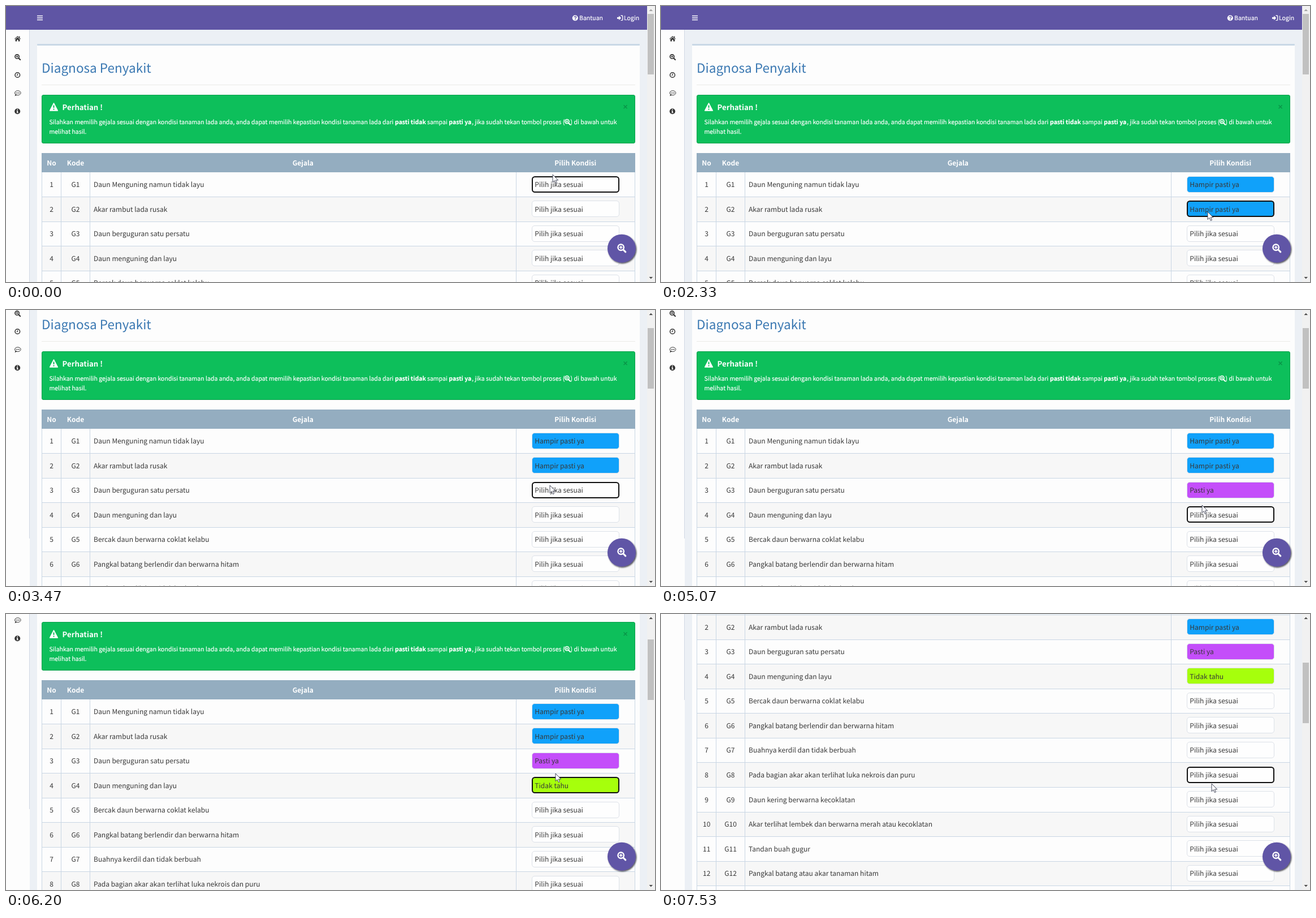
Recreate the animation shown at these times as an HTML page. Size 1148 px wide and 488 px high, loop 8000 ms.

```html
<!DOCTYPE html>
<html lang="id">
<head>
<meta charset="utf-8">
<title>Diagnosa Penyakit</title>
<style>
  html, body { margin: 0; width: 100%; height: 100%; overflow: hidden; background: #ecf0f5; }
  svg { display: block; width: 1148px; height: 488px; }
  text {
    font: 12.04px "Noto Sans CJK SC", "Noto Sans CJK JP", "Noto Sans CJK", sans-serif;
    fill: #383838; text-rendering: geometricPrecision;
  }
  .small { font-size: 10.54px; stroke: #fff; stroke-width: .2; }
  .white { fill: #fff; }
  .bold { font-weight: 700; }
  .mid { text-anchor: middle; }
  .title { font-size: 22.56px; fill: #3a78b2; }
  .head { font-size: 13.2px; }
  .line { fill: none; stroke: currentColor; }
</style>
</head>
<body>
<svg id="stage" viewBox="0 0 1148 488">
  <defs>
    <g id="zoom" class="line">
      <circle cx="-.9" cy="-.9" r="3.6" stroke-width="1.7"/>
      <path d="M1.9 1.9 4.7 4.7" stroke-width="2.1" stroke-linecap="round"/>
      <path d="M-2.8-.9H1M-.9-2.8V1" stroke-width="1.2"/>
    </g>
    <filter id="shade" x="-20%" y="-20%" width="150%" height="150%">
      <feDropShadow dx="1.3" dy="1.6" stdDeviation="1" flood-color="#14141c" flood-opacity=".75"/>
    </filter>
  </defs>

  <rect width="1148" height="488" fill="#ecf0f5"/>
  <rect width="42" height="488" fill="#fdfdfd"/>

  <g id="page">
    <rect x="41" y="42" width="1" height="446" fill="#d2d9e4"/>
    <rect width="1134" height="42" fill="#5f55a4"/>
    <path d="M55 17.5h10M55 21h10M55 24.5h10" stroke="#fff" stroke-width="1.7"/>
    <circle cx="1006.8" cy="21.2" r="5" fill="#fff"/>
    <path d="M1005 20c.1-2.2 3.7-2.2 3.7-.2 0 1.3-1.8 1.3-1.8 2.6M1006.9 23.2v1.5" fill="none" stroke="#5f55a4" stroke-width="1.4"/>
    <text class="small white" x="1014" y="25">Bantuan</text>
    <path d="M1081 19.7h3.2v-2.4l4 3.9-4 3.9v-2.4h-3.2z" fill="#fff"/>
    <path d="M1087.5 17h2.2q1.1 0 1.1 1.1v6.2q0 1.1-1.1 1.1h-2.2" fill="none" stroke="#fff" stroke-width="1.3"/>
    <text class="small white" x="1093" y="25">Login</text>

    <g color="#333" fill="#333">
      <path d="M20.5 53 26 58l-.7.8-4.8-4.3-4.8 4.3-.7-.8zM23 53.4h1.4v3L23 55zM20.5 55.5l3.9 3.4v3.7h-2.7v-2.8h-2.4v2.8h-2.7v-3.7z"/>
      <use href="#zoom" x="20.5" y="90.3"/>
      <circle class="line" cx="20.3" cy="122" r="4.3" stroke-width="1.5"/>
      <path class="line" d="M20.6 119.5v2.8h-2.2" stroke-width="1.1"/>
      <ellipse class="line" cx="20.8" cy="153.7" rx="5.3" ry="3.9"/>
      <path d="M16.5 156l-.9 3.2 4.2-2z"/>
      <path d="M17.5 153h1.5v1.5h-1.5zM20 153h1.5v1.5H20zM22.5 153H24v1.5h-1.5z"/>
      <circle cx="20.2" cy="186.2" r="5"/>
      <path d="M19.4 182.6h1.7v1.4h-1.7zM18.6 185h2.5v3.2h.8v1.1h-3.3v-1.1h.8v-2.1h-.8z" fill="#fff"/>
    </g>

    <rect x="55" y="68" width="1066" height="1100" fill="#fdfdfd"/>
    <rect x="55" y="67" width="1066" height="3" rx="1" fill="#c9d8e6"/>
    <text class="title" x="63" y="118">Diagnosa Penyakit</text>
    <rect x="63" y="139" width="1050" height="1" fill="#ebebe8"/>

    <rect x="63.5" y="157.5" width="1049" height="85" rx="2.5" fill="#0dbf5b" stroke="#06a04a"/>
    <path d="M84.5 171.8 91.4 185H77.6z" fill="#fff" stroke="#fff" stroke-width="1.4" stroke-linejoin="round"/>
    <path d="M84.5 175.5v4.6M84.5 181.6v2" stroke="#0dbf5b" stroke-width="2"/>
    <text class="head white bold" x="99.5" y="184">Perhatian !</text>
    <path d="M1092.6 175.3l6 6m0-6-6 6" stroke="#0a9448" stroke-width="1.5"/>
    <text class="small white" x="76.5" y="209">Silahkan memilih gejala sesuai dengan kondisi tanaman lada anda, anda dapat memilih kepastian kondisi tanaman lada dari</text>
    <text class="small white bold" x="688" y="209">pasti tidak</text>
    <text class="small white" x="745" y="209">sampai</text>
    <text class="small white bold" x="783.3" y="209">pasti ya</text>
    <text class="small white" x="824" y="209">, jika sudah tekan tombol proses (</text>
    <use href="#zoom" x="993.2" y="205" color="#fff"/>
    <text class="small white" x="998.6" y="209">) di bawah untuk</text>
    <text class="small white" x="76.5" y="226">melihat hasil.</text>

    <g id="table"></g>
  </g>

  <g filter="url(#shade)"><circle cx="1089" cy="428.7" r="25" fill="#6055a6"/></g>
  <use href="#zoom" transform="translate(1089 428) scale(1.45)" color="#fff"/>

  <rect x="1134" width="14" height="488" fill="#f1f1f1"/>
  <rect id="thumb" x="1135" y="14" width="11" height="107" fill="#c1c1c1"/>
  <path id="up" d="M1137.5 9l3.3-3.6 3.3 3.6z"/>
  <path d="M1137.5 479l3.3 3.6 3.3-3.6z" fill="#505050"/>
  <path id="cursor" d="M0 0v13.6l3.1-2.9 2.3 5 2.1-1-2.2-4.7h4.4z" fill="#fff" stroke="#33364a" stroke-width=".9"/>
</svg>

<script>
const LOOP = 8000;
const ROW_TOP = 294, ROW_STEP = 43.58, ROW_COUNT = 13;
const EMPTY = "Pilih jika sesuai";

const symptoms = [
  "Daun Menguning namun tidak layu",
  "Akar rambut lada rusak",
  "Daun berguguran satu persatu",
  "Daun menguning dan layu",
  "Bercak daun berwarna coklat kelabu",
  "Pangkal batang berlendir dan berwarna hitam",
  "Buahnya kerdil dan tidak berbuah",
  "Pada bagian akar akan terlihat luka nekrois dan puru",
  "Daun kering berwarna kecoklatan",
  "Akar terlihat lembek dan berwarna merah atau kecoklatan",
  "Tandan buah gugur",
  "Pangkal batang atau akar tanaman hitam"
];

// answers by row: time, label, fill
const answers = [
  [530, "Hampir pasti ya", "#10a1fa"],
  [2070, "Hampir pasti ya", "#10a1fa"],
  [4270, "Pasti ya", "#c44efa"],
  [5870, "Tidak tahu", "#a6ff0c"]
];
// time, focused row
const focus = [[0, 1], [1270, 2], [3470, 3], [5070, 4], [7530, 8]];
// time, scroll offset
const scroll = [[0, 0], [2600, 0], [2670, 30], [2740, 64], [2830, 84], [6070, 84],
  [6200, 143], [6270, 172], [6480, 290], [6600, 336]];
// time, pointer x, pointer y
const pointer = [[0, 967, 298], [530, 967, 298], [1200, 967, 364], [2330, 967, 364],
  [2640, 960, 305], [3070, 960, 305], [3270, 962, 310], [4270, 962, 310],
  [5000, 957, 345], [5870, 957, 345], [6150, 972, 282], [6730, 972, 282], [7070, 974, 300]];

const $ = id => document.getElementById(id);

function set(node, attrs) {
  for (const key in attrs) node.setAttribute(key, attrs[key]);
}
function add(tag, attrs, text) {
  const node = document.createElementNS("http://www.w3.org/2000/svg", tag);
  set(node, attrs);
  if (text !== undefined) node.textContent = text;
  return $("table").appendChild(node);
}
const box = (x, y, width, height, fill) => add("rect", { x, y, width, height, fill });
const label = (x, y, text, style = "") => add("text", { x, y, class: style }, text);

const rowBottom = n => n ? Math.round(337 + ROW_STEP * (n - 1)) : ROW_TOP;

function buildTable() {
  const fields = [];
  for (let n = 1; n <= ROW_COUNT; n++) {
    const top = rowBottom(n - 1), bottom = rowBottom(n);
    box(63, top + 1, 1050, bottom - top - 1, n % 2 ? "#fdfdfd" : "#f7f7f7");
    box(63, bottom, 1050, 1, "#c9d6e4");
    const middle = 316 + ROW_STEP * (n - 1), base = Math.floor(middle + 4.5);
    label(80.7, base, n, "mid");
    label(123, base, "G" + n, "mid");
    label(155, base, symptoms[n - 1] || "");
    const y = Math.floor(middle - 14);
    fields.push({ y, frame: add("rect", { rx: 4.5 }), value: label(935.3, base, EMPTY) });
  }
  for (const x of [63, 97, 148, 902, 1112]) box(x, ROW_TOP, 1, rowBottom(ROW_COUNT) - ROW_TOP, "#c9d6e4");
  box(63, 260, 1050, 34, "#94adc0");
  const heads = [[80.5, "No"], [123, "Kode"], [525.3, "Gejala"], [1007.3, "Pilih Kondisi"]];
  for (const [x, text] of heads) label(x, 281.7, text, "mid white bold");
  return fields;
}

function at(keys, t) {
  const next = keys.findIndex(key => key[0] > t);
  if (next < 0) return keys[keys.length - 1].slice(1);
  const a = keys[next - 1], b = keys[next];
  const k = (t - a[0]) / (b[0] - a[0]);
  return a.slice(1).map((v, i) => v + (b[i + 1] - v) * k);
}

const fields = buildTable();

function draw(t) {
  const active = focus.filter(key => key[0] <= t).pop()[1];
  fields.forEach(({ y, frame, value }, i) => {
    const answer = answers[i] && t >= answers[i][0] ? answers[i] : null;
    const focused = i + 1 === active;
    const weight = focused ? 2 : 1;
    // the outer edge stays put whatever the stroke weight
    set(frame, {
      x: 930 + weight / 2, y: y - 1 + weight / 2, width: 155 - weight, height: 29 - weight,
      fill: answer ? answer[2] : "#fefefe",
      stroke: focused ? "#101010" : "#dce1e8",
      "stroke-width": weight
    });
    value.textContent = answer ? answer[1] : EMPTY;
  });

  const offset = Math.round(at(scroll, t)[0]);
  set($("page"), { transform: `translate(0 ${-offset})` });
  set($("thumb"), { y: Math.floor(14 + offset * .217) });
  set($("up"), { fill: offset ? "#505050" : "#a3a3a3" });

  const [x, y] = at(pointer, t);
  set($("cursor"), { transform: `translate(${x} ${y})` });
}

const start = performance.now();
function tick() {
  draw((performance.now() - start) % LOOP);
  requestAnimationFrame(tick);
}
tick();
</script>
</body>
</html>
```
